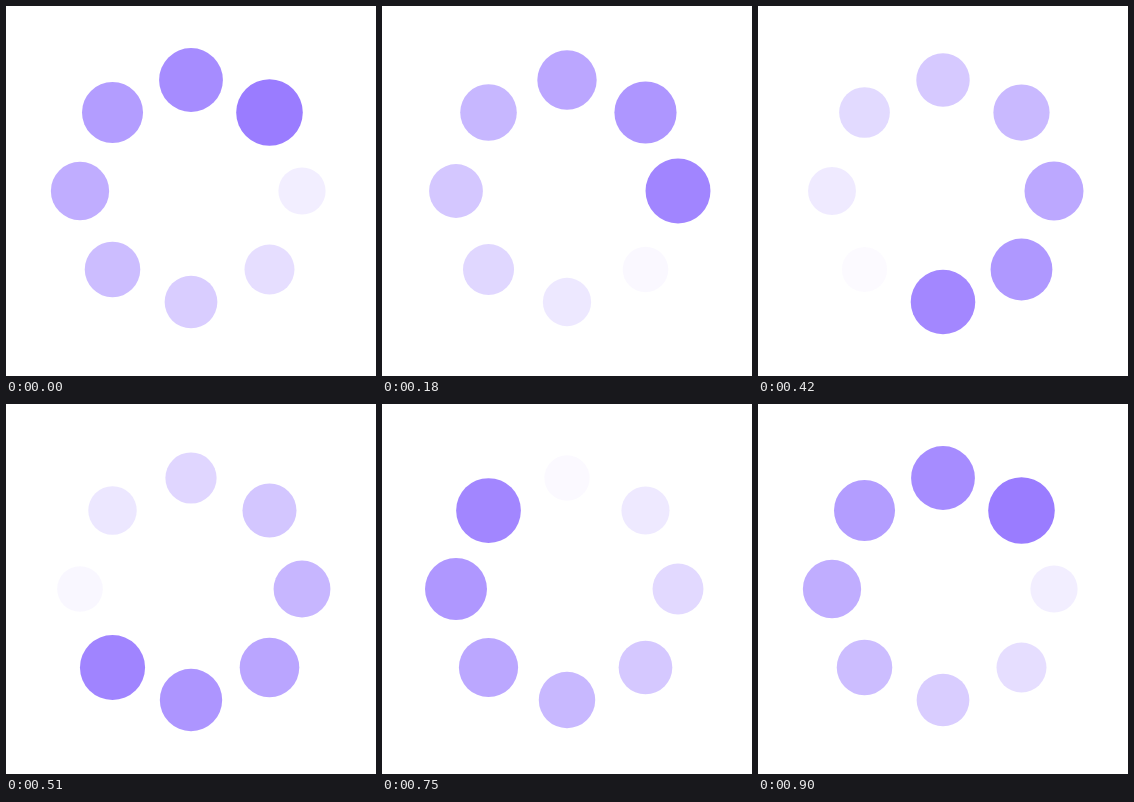
Animation of 370x370 px, one loop 930 ms. Source, as an HTML page:

```html
<!DOCTYPE html>
<html lang="en">
<head>
<meta charset="utf-8">
<title>Spinner</title>
<style>
  html, body { margin: 0; width: 100%; height: 100%; overflow: hidden; background: #fff; }
  svg { display: block; width: 100%; height: 100%; fill: #9a7cff; }
</style>
</head>
<body>
<svg viewBox="0 0 370 370"></svg>
<script>
const COUNT = 8, CENTER = 185, ORBIT = 111, RADIUS = 22.2;
const STEP = 30, LOOP = 930, STEPS_PER_TURN = 30;

const svg = document.querySelector('svg');
const dots = Array.from({ length: COUNT }, (_, i) => {
  const dot = document.createElementNS('http://www.w3.org/2000/svg', 'circle');
  const angle = (i - 1) * 2 * Math.PI / COUNT;
  dot.setAttribute('cx', CENTER + ORBIT * Math.cos(angle));
  dot.setAttribute('cy', CENTER + ORBIT * Math.sin(angle));
  return svg.appendChild(dot);
});

function draw(now) {
  const turn = Math.floor(now % LOOP / STEP) / STEPS_PER_TURN;
  dots.forEach((dot, i) => {
    // Each dot pops to full size, then shrinks and fades until its next turn.
    const life = 1 - (turn - i / COUNT + 1) % 1;
    dot.setAttribute('r', RADIUS * (1 + life / 2));
    dot.setAttribute('fill-opacity', life);
  });
}

const start = performance.now();
function tick() {
  draw(performance.now() - start);
  requestAnimationFrame(tick);
}
tick();
</script>
</body>
</html>
```
